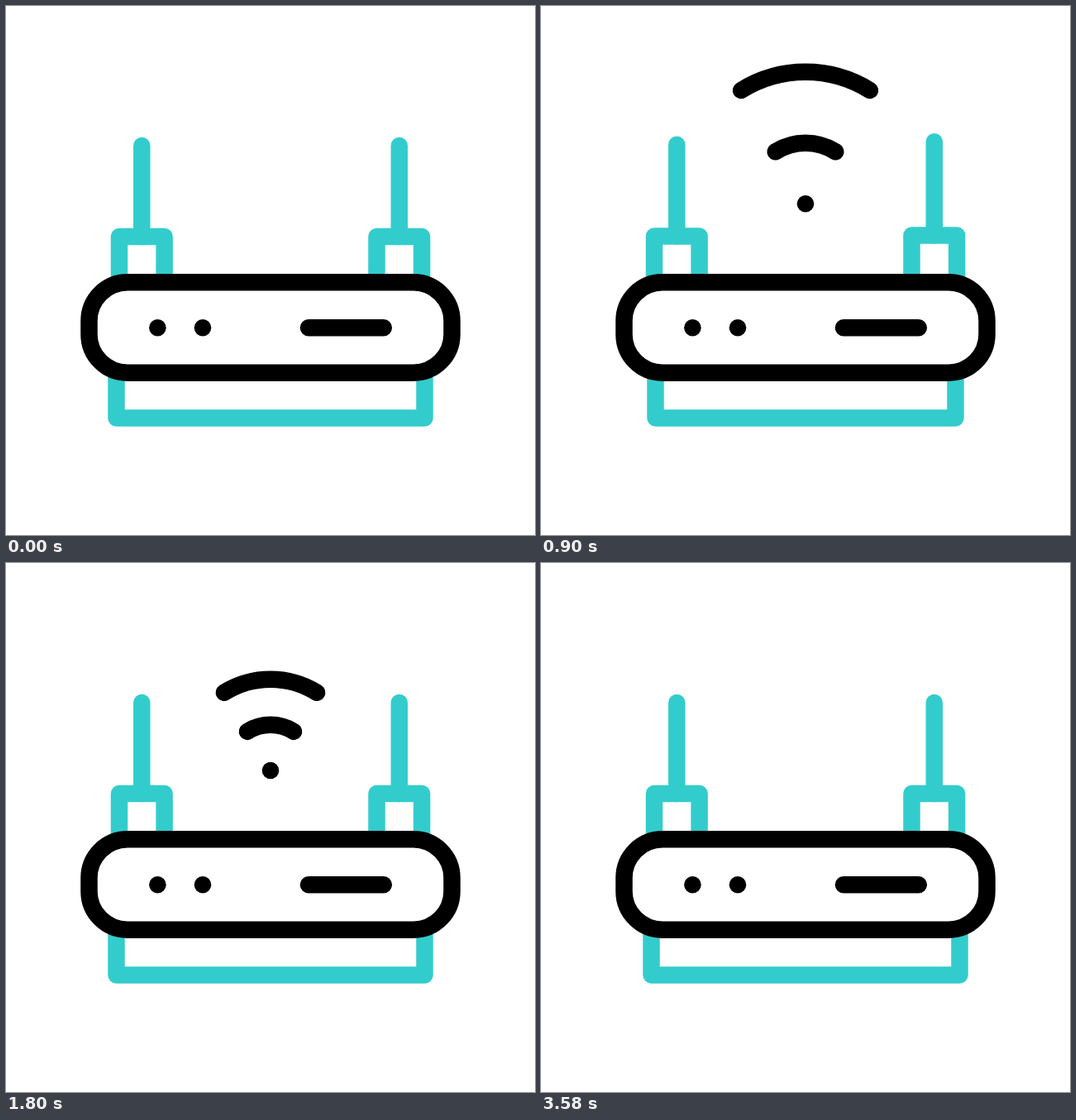
An HTML page with a canvas that plays this animation: 640x640 px, repeating every 3.6 s.

```html
<!DOCTYPE html>
<html lang="en">
<head>
<meta charset="utf-8">
<title>Wi-Fi router</title>
<style>
  html, body { margin: 0; width: 100%; height: 100%; overflow: hidden; background: #fff; }
  canvas { display: block; width: 640px; height: 640px; }
</style>
</head>
<body>
<canvas width="640" height="640"></canvas>
<script>
const ctx = document.querySelector('canvas').getContext('2d');
const LOOP = 3600, TICK = 20; // animation times below are in ticks
const TEAL = '#33cccc', BLACK = '#000';
const CENTER = 320, BODY_TOP = 334;

const bezier = (x1, y1, x2, y2) => u => {
  if (u <= 0) return 0;
  if (u >= 1) return 1;
  const at = (s, a, b) => 3 * (1 - s) ** 2 * s * a + 3 * (1 - s) * s * s * b + s ** 3;
  let low = 0, high = 1;
  for (let i = 0; i < 24; i++) {
    const mid = (low + high) / 2;
    if (at(mid, x1, x2) < u) low = mid; else high = mid;
  }
  return at(low, y1, y2);
};
const smooth = bezier(.33, 0, .67, 1);
const settle = bezier(.17, 0, .1, 1);
const plunge = bezier(.9, .05, 1, 0);

// keys: [time, value] pairs, eased between neighbours
function track(time, keys) {
  let value = keys[0][1];
  for (let i = 1; i < keys.length; i++) {
    const [t0, v0] = keys[i - 1], [t1, v1] = keys[i];
    if (time >= t0) value = v0 + (v1 - v0) * smooth((time - t0) / (t1 - t0));
  }
  return value;
}

function line(color, ...points) {
  ctx.strokeStyle = color;
  ctx.beginPath();
  points.forEach(([x, y]) => ctx.lineTo(x, y));
  ctx.stroke();
}

function dot(x, y) {
  ctx.fillStyle = BLACK;
  ctx.beginPath();
  ctx.arc(x, y, 10.3, 0, 2 * Math.PI);
  ctx.fill();
}

function antenna(x, stretch) {
  const y = height => BODY_TOP - height * stretch;
  const half = 27.3;
  line(TEAL, [x - half, BODY_TOP], [x - half, y(55)], [x + half, y(55)], [x + half, BODY_TOP]);
  line(TEAL, [x, y(55)], [x, y(165)]);
}

function base(inset) {
  const left = 133.5 + inset, right = 506.5 - inset;
  line(TEAL, [left, 444], [left, 498.5], [right, 498.5], [right, 444]);
}

// height: rest distance above the pivot; half: half chord; peak: overshoot scale
const signals = [
  { height: 46, half: 0, peak: 1.33, enter: 21, leave: 120 },
  { height: 101, half: 28, peak: 1.385, enter: 23, leave: 125 },
  { height: 156, half: 56, peak: 1.506, enter: 25, leave: 130 },
];
const PEAK_TIME = 38, SETTLE_TIME = 57, LEAVE_TIME = 50;

function signal(time, { height, half, peak, enter, leave }) {
  const leaving = (time - leave) / LEAVE_TIME;
  if (time < enter || leaving >= .95) return;

  let scale, sunk;
  if (time < PEAK_TIME) {
    const rise = smooth((time - enter) / (PEAK_TIME - enter));
    scale = peak * rise;
    sunk = 1 - rise;
  } else {
    sunk = plunge(leaving);
    scale = peak + (1 - peak) * settle((time - PEAK_TIME) / SETTLE_TIME) - sunk;
  }

  const top = 297 + 88 * sunk - height * scale;
  if (!half) return dot(CENTER, top);
  const sag = half * 2 / 7;
  const radius = (half * half + sag * sag) / (2 * sag) * scale;
  const spread = Math.asin(half * scale / radius);
  ctx.strokeStyle = BLACK;
  ctx.beginPath();
  ctx.arc(CENTER, top + radius, radius, -Math.PI / 2 - spread, -Math.PI / 2 + spread);
  ctx.stroke();
}

function body() {
  ctx.fillStyle = '#fff';
  ctx.strokeStyle = BLACK;
  ctx.beginPath();
  ctx.roundRect(100.5, BODY_TOP + .3, 439, 109.4, 46.5);
  ctx.fill();
  ctx.stroke();
  dot(183.4, 389.2);
  dot(238, 389.2);
  line(BLACK, [366, 389.2], [456.8, 389.2]);
}

function draw(time) {
  ctx.fillStyle = '#fff';
  ctx.fillRect(0, 0, 640, 640);
  ctx.lineWidth = 20.5;
  ctx.lineCap = ctx.lineJoin = 'round';
  antenna(164.3, track(time, [[5, 1], [27, 1.424], [46.6, 1]]));
  antenna(475.8, track(time, [[8.5, 1], [31, 1.424], [47.7, 1]]));
  base(track(time, [[5, 0], [25, 39], [45, 5], [85, 0]]));
  signals.forEach(s => signal(time, s));
  body();
}

function frame() {
  draw(performance.now() % LOOP / TICK);
  requestAnimationFrame(frame);
}
frame();
</script>
</body>
</html>
```
